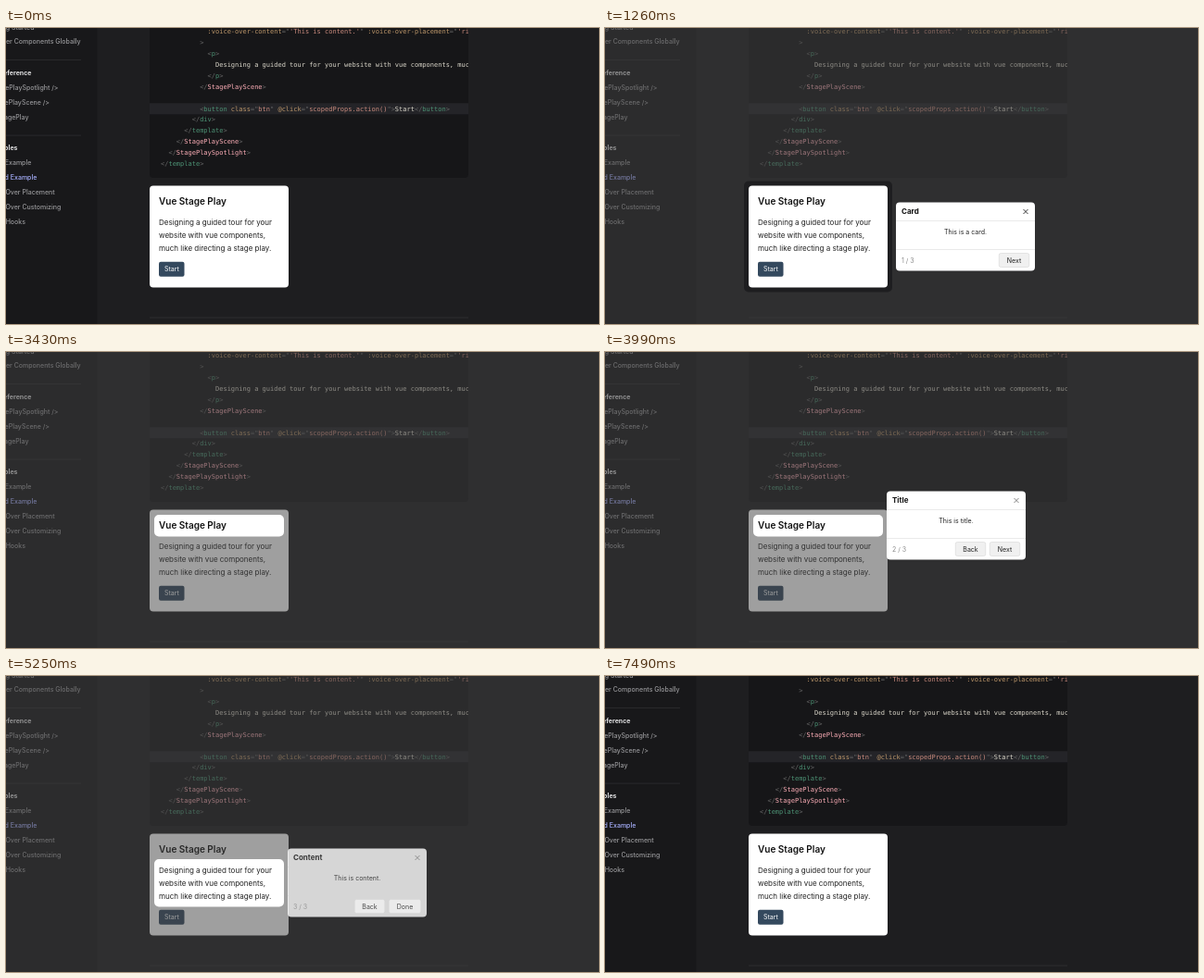
These frames come from a looping animation (640x320 px, 7.56 s). An HTML page with a canvas:

```html
<!DOCTYPE html>
<html lang="en">
<head>
<meta charset="utf-8">
<title>Vue Stage Play</title>
<style>
html, body { margin: 0; width: 100%; height: 100%; overflow: hidden; background: #1e1e20; }
canvas { display: block; }
</style>
</head>
<body>
<canvas id="stage" width="640" height="320"></canvas>
<script>
const ctx = document.getElementById('stage').getContext('2d');
const LOOP = 7560, STEP = 70;
const SANS = 'Inter, "Noto Sans", sans-serif';
const MONO = '"DejaVu Sans Mono", "Liberation Mono", monospace';
const CODE = {
  p: '#666666', t: '#4d9375', c: '#fdaeb7', a: '#bd976a', s: '#c98a7d', w: '#dbd7ca'
};

function box(x, y, w, h, r, fill, stroke) {
  ctx.beginPath();
  ctx.roundRect(x, y, w, h, r);
  if (fill) { ctx.fillStyle = fill; ctx.fill(); }
  if (stroke) { ctx.strokeStyle = stroke; ctx.lineWidth = 0.5; ctx.stroke(); }
}

function rect(x, y, w, h, fill) {
  ctx.fillStyle = fill;
  ctx.fillRect(x, y, w, h);
}

function text(str, x, y, size, color, weight = 400, align = 'left') {
  ctx.font = `${weight} ${size}px ${SANS}`;
  ctx.textAlign = align;
  ctx.fillStyle = color;
  ctx.fillText(str, x, y);
}

// Each code line: indent, then [style, text] runs.
const open = (kind, name) => [['p', '<'], [kind, name]];
const close = (kind, name) => [['p', '</'], [kind, name], ['p', '>']];
const attr = (name, value) => [['a', name], ['p', '="'], ['s', value], ['p', '"']];
const lines = [
  [12, ...attr(':voice-over-content', "'This is content.'"), ['p', ' '],
    ...attr(':voice-over-placement', "'right'")],
  [10, ['p', '>']],
  [12, ...open('t', 'p'), ['p', '>']],
  [14, ['w', 'Designing a guided tour for your website with vue components, much like']],
  [12, ...close('t', 'p')],
  [10, ...close('c', 'StagePlayScene')],
  [0],
  [10, ...open('t', 'button'), ['p', ' '], ...attr('class', 'btn'), ['p', ' '],
    ...attr('@click', 'scopedProps.action()'), ['p', '>'], ['w', 'Start'], ...close('t', 'button')],
  [8, ...close('t', 'div')],
  [6, ...close('t', 'template')],
  [4, ...close('c', 'StagePlayScene')],
  [2, ...close('c', 'StagePlaySpotlight')],
  [0, ...close('t', 'template')]
];

// Sidebar entries: label, right edge, baseline.
const links = [
  ['Getting Started', 30.5, 1.5], ['Voice Over Components Globally', 80.5, 17],
  ['<StagePlaySpotlight />', 56.5, 66.5], ['<StagePlayScene />', 47, 82.5],
  ['useStagePlay', 24.5, 98.5], ['Basic Example', 27.3, 148],
  ['Advanced Example', 33.3, 164], ['Voice Over Placement', 52.7, 180],
  ['Voice Over Customizing', 59.3, 196], ['Hooks', 21, 212]
];

function drawSidebar() {
  rect(0, 0, 98.5, 320, '#18181a');
  rect(0, 34.5, 81, 0.5, '#3a3a3d');
  rect(0, 115.8, 81, 0.5, '#3a3a3d');
  for (const [label, x, y] of links) {
    const color = label === 'Advanced Example' ? '#a8b1ff' : '#98989b';
    text(label, x, y, 7, color, 500, 'right');
  }
  text('API Reference', 27.5, 50.5, 7, '#dfdfe0', 700, 'right');
  text('Examples', 12.5, 132, 7, '#dfdfe0', 700, 'right');
}

function drawCode() {
  ctx.save();
  box(155, -20, 344, 182, 4, '#161618');
  ctx.clip();
  rect(155, 81.3, 344, 12, '#242428');
  ctx.font = `400 7px ${MONO}`;
  ctx.textAlign = 'left';
  const cell = ctx.measureText('0').width;
  lines.forEach(([indent, ...runs], i) => {
    let x = 167 + indent * cell;
    for (const [kind, str] of runs) {
      ctx.fillStyle = CODE[kind];
      ctx.fillText(str, x, 6.2 + i * 11.9);
      x += str.length * cell;
    }
  });
  ctx.restore();
}

function drawCard() {
  box(155, 170.5, 150, 110, 4, '#fff');
  text('Vue Stage Play', 165, 191.2, 10, '#111', 600);
  ['Designing a guided tour for your', 'website with vue components,',
    'much like directing a stage play.'].forEach((str, i) => text(str, 165, 212.6 + i * 14, 8, '#222'));
  box(165, 252.7, 27.5, 16, 2, '#34495e');
  text('Start', 178.8, 263.3, 7, '#fff', 400, 'center');
}

function drawShade(hole, alpha) {
  if (alpha <= 0) return;
  ctx.globalAlpha = alpha;
  ctx.beginPath();
  ctx.rect(0, 0, 640, 320);
  ctx.roundRect(...hole, 5);
  ctx.fillStyle = 'rgba(64,64,64,.5)';
  ctx.fill('evenodd');
  ctx.globalAlpha = 1;
}

// Buttons are [label, left offset, width].
const scenes = [
  { hole: [150, 165.5, 160, 120], at: [314, 188.5], title: 'Card', body: 'This is a card.',
    cross: '#222', buttons: [['Next', 111, 33]],
    shade: [930, 1090, 3170, 3330], pop: [1050, 1260, 2960, 3170] },
  { hole: [160, 176, 140, 23.5], at: [304, 150.5], title: 'Title', body: 'This is title.',
    cross: '#777', buttons: [['Back', 74, 33], ['Next', 111, 33]],
    shade: [3250, 3420, 4970, 5110], pop: [3430, 3640, 4770, 4970] },
  { hole: [160, 198, 140, 51.5], at: [304, 186.5], title: 'Content', body: 'This is content.',
    cross: '#777', buttons: [['Back', 72, 33], ['Done', 109, 35]],
    shade: [5030, 5180, 6800, 7100], pop: [5150, 5350, 6580, 6800] }
];

function drawPopup(scene, index, alpha) {
  if (alpha <= 0) return;
  ctx.save();
  ctx.globalAlpha = alpha;
  ctx.translate(...scene.at);
  box(0, 0, 150, 74, 4, '#fff');
  rect(0, 19.5, 150, 0.5, '#d5d5d5');
  rect(0, 50.5, 150, 0.5, '#d5d5d5');
  text(scene.title, 6, 12.8, 8, '#111', 700);
  ctx.beginPath();
  ctx.moveTo(137.5, 7.5); ctx.lineTo(142.5, 12.5);
  ctx.moveTo(142.5, 7.5); ctx.lineTo(137.5, 12.5);
  ctx.strokeStyle = scene.cross;
  ctx.lineWidth = 0.9;
  ctx.stroke();
  text(scene.body, 75, 34.2, 7, '#222', 400, 'center');
  text(`${index + 1} / 3`, 6, 65.2, 7, '#888');
  for (const [label, x, w] of scene.buttons) {
    box(x + 0.25, 55, w - 0.5, 15, 2, '#f0f0f0', '#cfcfcf');
    text(label, x + w / 2, 65.2, 7, '#222', 400, 'center');
  }
  ctx.restore();
}

// cubic-bezier(.25, .1, .25, 1), solved by bisection
function ease(x) {
  if (x <= 0) return 0;
  if (x >= 1) return 1;
  const curve = (a, b, u) => 3 * a * u * (1 - u) ** 2 + 3 * b * u * u * (1 - u) + u ** 3;
  let lo = 0, hi = 1;
  for (let i = 0; i < 20; i++) {
    const mid = (lo + hi) / 2;
    if (curve(0.25, 0.25, mid) < x) lo = mid; else hi = mid;
  }
  return curve(0.1, 1, lo);
}

const fade = ([inA, inB, outA, outB], t) =>
  ease((t - inA) / (inB - inA)) - ease((t - outA) / (outB - outA));

function draw(t) {
  rect(0, 0, 640, 320, '#1e1e20');
  drawSidebar();
  drawCode();
  rect(155, 312.8, 344, 0.5, '#3c3c3f');
  drawCard();
  for (const s of scenes) drawShade(s.hole, fade(s.shade, t));
  scenes.forEach((s, i) => drawPopup(s, i, fade(s.pop, t)));
}

const start = performance.now();
function tick() {
  const t = (performance.now() - start) % LOOP;
  draw(Math.floor(t / STEP) * STEP);
  requestAnimationFrame(tick);
}
tick();
</script>
</body>
</html>
```
